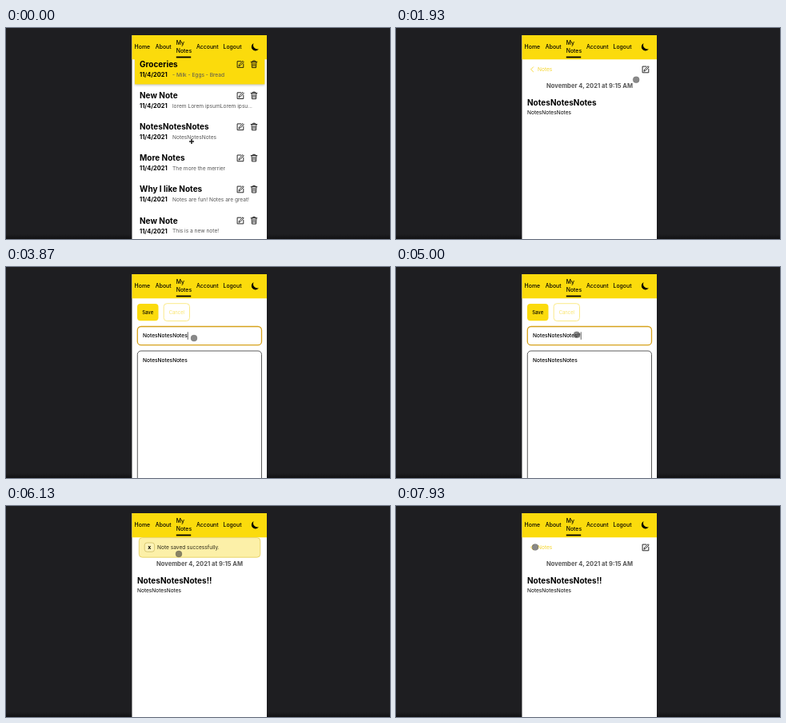
These frames come from a looping animation (480x264 px, 8 s). An HTML page:

```html
<!DOCTYPE html>
<html lang="en">
<head>
<meta charset="utf-8">
<title>Notes app</title>
<style>
  html, body { margin: 0; width: 100%; height: 100%; overflow: hidden; background: #1e1e21; }
  svg { display: block; width: 100%; height: 100%; }
  text { font-family: Inter, "Open Sans", sans-serif; font-size: 6.6px; white-space: pre; }
  .nav text { font-size: 6.9px; font-weight: 450; }
  .title { font-size: 10px; font-weight: 700; }
  .date { font-size: 7.4px; font-weight: 700; }
  .line { fill: none; stroke: #111; stroke-width: .9; stroke-linejoin: round; stroke-linecap: round; }
  .hot { fill: #fbdb0c; filter: drop-shadow(0 1px 1.5px #0004); }
  .field { fill: #fff; stroke: #333; stroke-width: .8; }
  .field.focus { stroke: #d6a21c; stroke-width: 1.3; }
  .small { font-size: 5.9px; }
  .pressed { fill: #b4ba70; filter: drop-shadow(0 .5px 1px #0006); }
</style>
</head>
<body>
<svg viewBox="0 0 480 264" xmlns="http://www.w3.org/2000/svg">
  <defs>
    <linearGradient id="fade" x2="0" y2="1">
      <stop offset="0" stop-color="#111113" stop-opacity="0"/>
      <stop offset="1" stop-color="#111113"/>
    </linearGradient>
    <g id="edit" class="line">
      <path d="M.8-3.6H-3.9V4.1H3.8V-.4"/>
      <path d="M-1.9 2.1L-1.3.3 3-4 4.2-2.8-.1 1.5Z"/>
    </g>
    <g id="bin" class="line">
      <path d="M-3.8-3H3.8M-1.4-3V-4.3H1.4V-3M-3-3L-2.5 4.3H2.5L3-3M-1-1.3V2.6M1-1.3V2.6"/>
    </g>
  </defs>
  <rect width="480" height="264" fill="#1e1e21"/>
  <rect y="258" width="480" height="6" fill="url(#fade)"/>
  <rect x="157.5" y="9" width="168.5" height="255" fill="#fff"/>

  <g id="list"></g>

  <g id="note">
    <path d="M171.6 48.8L168.6 51.8 171.6 54.8" class="line" style="stroke:#f5d52c"/>
    <text x="177" y="54.3" fill="#f5d52c">Notes</text>
    <use href="#edit" x="312" y="51.7"/>
    <text x="242" y="75" text-anchor="middle" fill="#555" style="font-size:7.6px;font-weight:700">November 4, 2021 at 9:15 AM</text>
    <text id="heading" class="title" x="164" y="97"></text>
    <text x="164" y="107.6">NotesNotesNotes</text>
  </g>

  <g id="form">
    <rect id="save" x="164" y="46" width="26.5" height="21.3" rx="4" fill="#fbdb0c"/>
    <text class="small" x="177.2" y="58.6" text-anchor="middle" font-weight="500">Save</text>
    <g id="cancel">
      <rect x="197.2" y="45.7" width="32.3" height="21.8" rx="4" fill="#fff" stroke="#f8dc3a" stroke-width=".8"/>
      <text class="small" x="213.4" y="58.6" text-anchor="middle" fill="#f8dc3a">Cancel</text>
    </g>
    <rect id="input" class="field" x="164.3" y="74.5" width="155.2" height="23.2" rx="4.5"/>
    <rect class="field" x="164.3" y="105" width="155.2" height="180" rx="4.5"/>
    <text id="value" x="171" y="88.4" font-weight="450"></text>
    <path id="caret" stroke="#222" stroke-width=".7"/>
    <text x="171" y="119" font-weight="450">NotesNotesNotes</text>
  </g>

  <g class="nav">
    <rect x="157.5" y="9" width="168.5" height="30.3" fill="#fbdb0c"/>
    <text x="160.6" y="26.2">Home</text>
    <text x="186.8" y="26.2">About</text>
    <text x="212.7" y="21.3">My</text>
    <text x="212.7" y="31.4">Notes</text>
    <text x="238" y="26.2">Account</text>
    <text x="271.5" y="26.2">Logout</text>
    <rect x="212.8" y="35.6" width="18.4" height="1.8"/>
    <path d="M309.6 19A5 5 0 1 0 316 26.2A5.2 5.2 0 0 1 309.6 19Z"/>
  </g>

  <g id="toast">
    <rect x="166.3" y="39.6" width="151.5" height="24.6" rx="4" fill="#fcf0a8" stroke="#e2cc55" stroke-width=".8"/>
    <rect x="173.2" y="46" width="12.4" height="11.2" rx="3" fill="#fdf3b8" stroke="#c9b75a" stroke-width=".7"/>
    <text x="179.4" y="53.6" text-anchor="middle" style="font-size:5.4px;font-weight:800">X</text>
    <text x="189" y="53.5" fill="#2d2a18">Note saved successfully.</text>
  </g>

  <path id="cross" d="M229 142H235M232 139V145" stroke="#222" stroke-width="1.6"/>
  <circle id="dot" r="4" fill="#333" fill-opacity=".58" stroke="#444" stroke-opacity=".3" stroke-width=".6"/>
</svg>
<script>
const LOOP = 8000, STEP = 1000 / 15;
const $ = id => document.getElementById(id);
const show = (id, on) => { $(id).style.display = on ? '' : 'none'; };
const within = (t, a, b) => t >= a && t < b;

const notes = [
  ['Groceries', '- Milk - Eggs - Bread'],
  ['New Note', 'lorem Lorem ipsumLorem ipsu...'],
  ['NotesNotesNotes', 'NotesNotesNotes'],
  ['More Notes', 'The more the merrier'],
  ['Why I like Notes', 'Notes are fun! Notes are great!'],
  ['New Note', 'This is a new note!']
];
$('list').innerHTML = '<rect class="hot" x="161" y="34" width="162.3" height="36.4"/>' +
  notes.map(([title, body], i) => `<g transform="translate(0 ${i * 39.1})">
    <text class="title" x="167" y="49">${title}</text>
    <text class="date" x="167" y="61">11/4/2021</text>
    <text x="208" y="60.8" fill="#555">${body}</text>
    <use href="#edit" x="293" y="45.3"/><use href="#bin" x="310" y="45.3"/></g>`).join('');

// Pointer stops: time, x, y
const path = [
  [0, 232, 142], [330, 229, 64], [600, 230, 157], [800, 236, 136],
  [1333, 236, 136], [2133, 312, 51.5],
  [2933, 312, 51.5], [3470, 230, 110], [3667, 235, 89],
  [4867, 235, 89], [5400, 176.5, 61.5],
  [5600, 176.5, 61.5], [6133, 216, 60], [6400, 170, 60],
  [7000, 170, 60], [7267, 186, 52],
  [7667, 186, 52], [7933, 174, 51.5]
];

function pointer(t) {
  const i = path.findIndex(p => p[0] > t);
  if (i < 0) return path[path.length - 1].slice(1);
  const [a, x0, y0] = path[i - 1], [b, x1, y1] = path[i];
  const u = (t - a) / (b - a), k = u * u * (3 - 2 * u);
  return [x0 + (x1 - x0) * k, y0 + (y1 - y0) * k];
}

function draw(t) {
  const editing = within(t, 2660, 5790);
  const focused = within(t, 3860, 5395);
  const marks = t < 4530 ? '' : t < 4660 ? '!' : '!!';

  show('list', t < 995);
  show('note', t >= 995 && !editing);
  show('form', editing);
  show('toast', within(t, 5790, 7460));

  $('heading').textContent = $('value').textContent = 'NotesNotesNotes' + marks;
  $('input').classList.toggle('focus', focused);
  $('save').classList.toggle('pressed', within(t, 5595, 5790));
  $('cancel').setAttribute('opacity', t < 5395 ? .75 : 1);

  show('caret', focused && !within(t, 4195, 4330));
  if (editing) {
    const end = 171.5 + $('value').getComputedTextLength();
    $('caret').setAttribute('d', `M${end} 81.3V90.8`);
  }

  const [x, y] = pointer(t);
  show('cross', t < 60);
  show('dot', t >= 60 && !within(t, 4530, 4930));
  $('dot').setAttribute('cx', x);
  $('dot').setAttribute('cy', y);
  $('dot').setAttribute('r', within(t, 2265, 2395) ? 3.5 : 4);
}

const start = performance.now();
function tick() {
  const t = (performance.now() - start) % LOOP;
  draw(Math.floor((t + 5) / STEP) * STEP % LOOP);
  requestAnimationFrame(tick);
}
tick();
</script>
</body>
</html>
```
